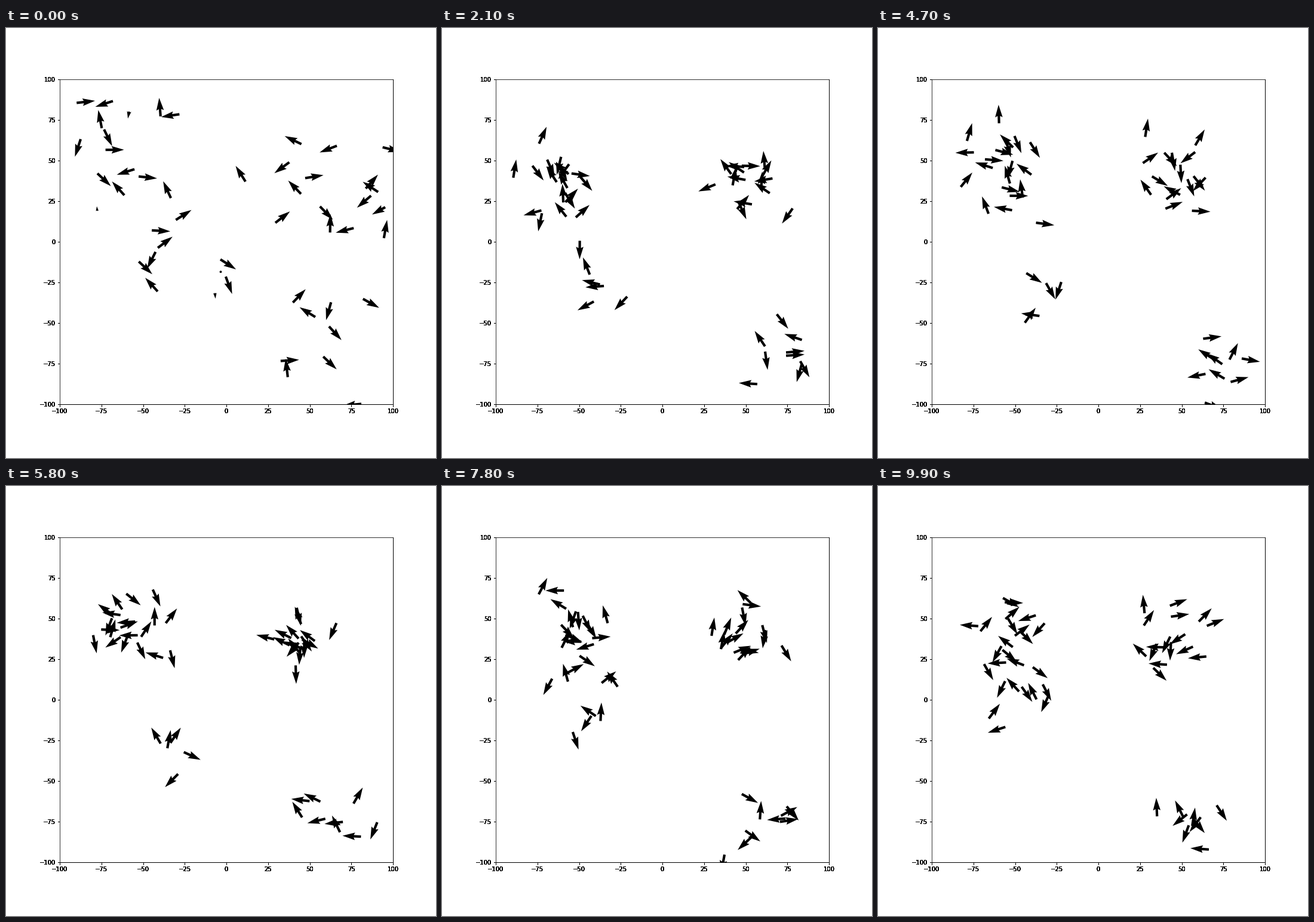
These frames come from a looping animation (720x720 px, 10000 ms). A matplotlib script:

```python
import numpy as np
import matplotlib.pyplot as plt
from matplotlib.animation import FuncAnimation

FRAMES, INTERVAL = 100, 100
LIMIT = 100
SPEED = 2.0       # data units per step
MAX_FORCE = 0.8
PULL = 0.05
LABEL_LAYERS = 8

# Each flock starts scattered in a box around `start`, then gathers around a
# centre that drifts along `path`; `roam` is how far its birds spread.
FLOCKS = [
    dict(count=16, start=(45, 30), box=(52, 33), roam=(8, 7),
         path=[(52, 34), (49, 40), (49, 38)]),
    dict(count=20, start=(-62, 42), box=(36, 55), roam=(9, 14),
         path=[(-66, 24), (-54, 42), (-52, 33)]),
    dict(count=5, start=(-30, -32), box=(30, 25), roam=(4, 4),
         path=[(-33, -27), (-35, -28), (-46, 8)]),
    dict(count=9, start=(65, -65), box=(35, 35), roam=(8, 5),
         path=[(76, -72), (66, -77), (56, -78)]),
]


def limit(vectors, top):
    """Shorten vectors that are longer than `top`."""
    size = np.linalg.norm(vectors, axis=1, keepdims=True)
    return vectors * np.minimum(1, top / np.maximum(size, 1e-9))


def drift(path, step):
    when = np.linspace(0, FRAMES - 1, len(path))
    return np.array([np.interp(step, when, axis) for axis in zip(*path)])


def fly(rng, count, start, box, roam, path):
    """Positions and velocities of one flock at every step."""
    pos = start + rng.uniform(-1, 1, (count, 2)) * box
    vel = limit(rng.normal(0, 3 * SPEED, (count, 2)), SPEED)
    perch = rng.normal(0, 1, (count, 2)).clip(-1.5, 1.5) * roam

    states = []
    for step in range(FRAMES):
        states.append(np.hstack([pos, vel]))
        goal = drift(path, step) + perch
        vel = vel + limit(PULL * (goal - pos), MAX_FORCE)
        vel = vel * SPEED / np.linalg.norm(vel, axis=1, keepdims=True)
        pos = pos + vel
    return np.array(states)


rng = np.random.default_rng(4)
history = np.concatenate([fly(rng, **flock) for flock in FLOCKS], axis=1)

fig = plt.figure(figsize=(10, 10), dpi=72, facecolor="white")
fig.subplots_adjust(left=0.125, right=0.9, bottom=0.125, top=0.88)

# Stacked axes give the heavy tick labels.
ticks = np.arange(-LIMIT, LIMIT + 1, 25)
for _ in range(LABEL_LAYERS):
    ax = fig.add_subplot()
    ax.set(xlim=(-LIMIT, LIMIT), ylim=(-LIMIT, LIMIT),
           xticks=ticks, yticks=ticks)

x, y, u, v = history[0].T
arrows = ax.quiver(x, y, u, v, scale=18 * SPEED, color="black")


def update(frame):
    x, y, u, v = history[frame].T
    arrows.set_offsets(np.column_stack([x, y]))
    arrows.set_UVC(u, v)
    return arrows,


anim = FuncAnimation(fig, update, frames=FRAMES, interval=INTERVAL,
                     repeat=True, repeat_delay=0, blit=False)
plt.show()
```
